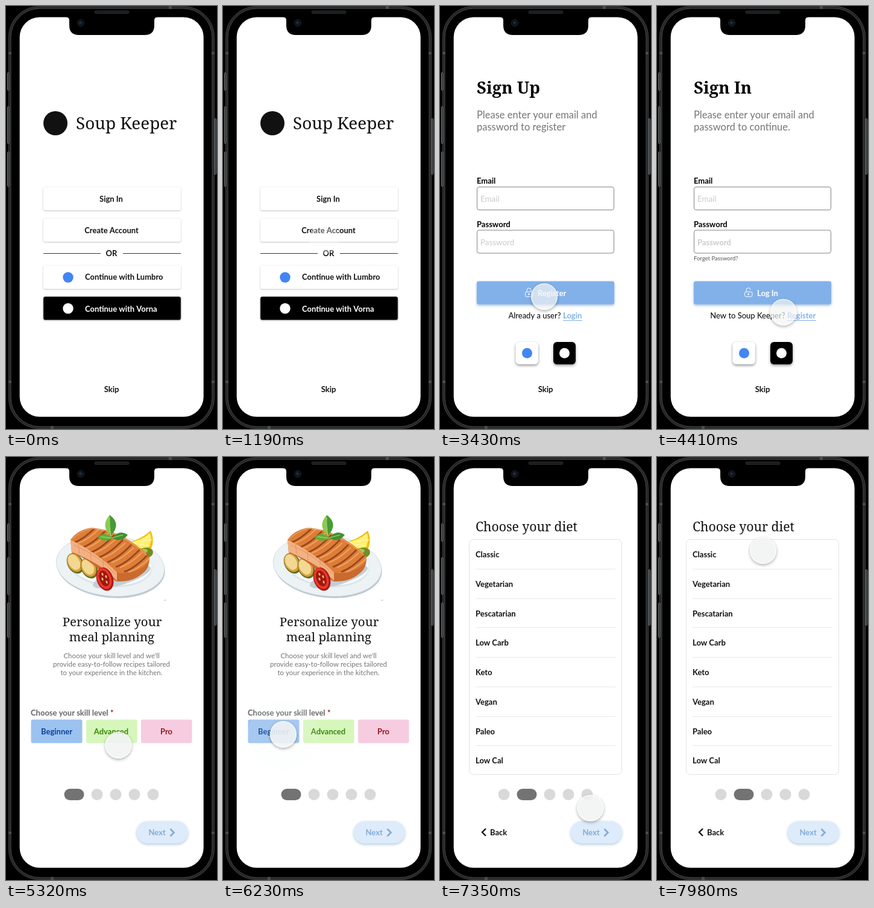
Recreate the animation shown at these times as an HTML page with a canvas. Size 350 by 700 pixels, loop 8 s.

```html
<!DOCTYPE html>
<html lang="en">
<head>
<meta charset="utf-8">
<title>Recipe app onboarding</title>
<style>
  html, body { margin: 0; width: 100%; height: 100%; overflow: hidden; background: #000; }
  canvas { display: block; width: 350px; height: 700px; }
</style>
</head>
<body>
<canvas id="stage" width="350" height="700"></canvas>
<script>
const ctx = document.getElementById('stage').getContext('2d');
const LOOP = 8000;
const SANS = 'Lato, sans-serif';
const SERIF = '"Noto Serif", serif';
const BLUE = '#82b1ea';

// ---------- helpers ----------
const clamp = v => Math.max(0, Math.min(1, v));
const progress = (t, from, to) => clamp((t - from) / (to - from));
const easeInOut = p => p * p * (3 - 2 * p);
const easeOut = p => 1 - (1 - p) ** 3;

function text(str, x, y, { size = 13, weight = 'bold', color = '#111', align = 'left', family = SANS } = {}) {
  ctx.font = `${weight} ${size}px ${family}`;
  ctx.fillStyle = color;
  ctx.textAlign = align;
  ctx.fillText(str, x, y);
}

const centered = (str, x, y, options = {}) => text(str, x, y, { ...options, align: 'center' });

function box(x, y, w, h, r, fill, stroke, width = 1) {
  ctx.beginPath();
  ctx.roundRect(x, y, w, h, r);
  if (fill) { ctx.fillStyle = fill; ctx.fill(); }
  if (stroke) { ctx.strokeStyle = stroke; ctx.lineWidth = width; ctx.stroke(); }
}

function shadowed(color, blur, dy, draw) {
  ctx.save();
  ctx.shadowColor = color;
  ctx.shadowBlur = blur;
  ctx.shadowOffsetY = dy;
  draw();
  ctx.restore();
}

function oval(x, y, rx, ry, fill, angle = 0, stroke, width = 1) {
  ctx.beginPath();
  ctx.ellipse(x, y, rx, ry, angle, 0, Math.PI * 2);
  if (fill) { ctx.fillStyle = fill; ctx.fill(); }
  if (stroke) { ctx.strokeStyle = stroke; ctx.lineWidth = width; ctx.stroke(); }
}

const dot = (x, y, r, fill) => oval(x, y, r, r, fill);

function shape(d, fill) {
  ctx.fillStyle = fill;
  ctx.fill(new Path2D(d));
}

function line(d, color, width = 1) {
  ctx.strokeStyle = color;
  ctx.lineWidth = width;
  ctx.stroke(new Path2D(d));
}

// ---------- shared parts ----------
const skip = () => centered('Skip', 175, 639);

function pageDots(active) {
  let x = 96.5;
  for (let i = 0; i < 5; i++) {
    const w = i === active ? 33 : 19;
    box(x, 549, w, 19, 9.5, i === active ? '#737373' : '#d9d9d9');
    x += w + 12;
  }
}

function nextButton() {
  shadowed('rgba(95,140,190,.45)', 4, 2, () => box(216.5, 602.5, 85.5, 37, 18.5, '#deebfa'));
  text('Next', 236.5, 626, { color: '#83abd8' });
  line('M272.5 615.5 L278.5 621.5 L272.5 627.5', '#83abd8', 2.8);
}

function headline(title, lines) {
  text(title, 61, 145, { size: 27.5, family: SERIF, color: '#000' });
  lines.forEach((str, i) => text(str, 61, 186 + i * 19.5, { size: 16.5, weight: 'normal', color: '#757575' }));
}

function field(label, y, weight) {
  text(label, 61, y - 5, { color: '#000' });
  box(61.5, y + .5, 227, 38, 3.5, '#fff', '#848484');
  text(label, 67, y + 25, { size: weight === 'bold' ? 13 : 13.4, weight, color: '#cbcbcb' });
}

function lock(x, open) {
  line(`M${x + 3} 473 V470.5 a3.6 3.6 0 0 1 7.2 ${open ? -.8 : 0} ${open ? '' : 'V473'}`, '#fff');
  box(x + .5, 473, 12.5, 8, 2.5, null, '#fff');
  dot(x + 6.7, 477, 1.4, '#fff');
}

function form({ title, intro, boldPassword, action, actionX, open, question, questionEnd, link, linkX, linkEnd }) {
  headline(title, intro);
  field('Email', 299, 'normal');
  field('Password', 370.5, boldPassword ? 'bold' : 'normal');
  shadowed('rgba(90,140,200,.6)', 4, 2, () => box(61, 455.5, 228, 38, 3, BLUE));
  lock(actionX - 21, open);
  text(action, actionX, 480, { color: '#fff' });
  text(question, questionEnd, 517, { weight: 'normal', align: 'right', color: '#000' });
  text(link, linkX, 517, { color: BLUE });
  line(`M${linkX} 520.5 H${linkEnd}`, BLUE);
  const edge = 'rgba(0,0,0,.42)';
  shadowed(edge, 4, 2, () => box(125.5, 556, 37.5, 37, 6, '#fff'));
  shadowed(edge, 4, 2, () => box(188, 556, 37, 37, 6, '#000'));
  dot(144.5, 574.5, 8.5, '#4285f4');
  dot(206.5, 574.5, 8.5, '#fff');
  skip();
}

// ---------- screens ----------
function welcome() {
  dot(82, 194, 20, '#111');
  text('Soup Keeper', 116, 204, { size: 27.9, weight: 'normal', family: SERIF });

  const button = (y, fill) => shadowed('rgba(0,0,0,.24)', 3, 1, () => box(62, y, 228, 38.5, 3, fill));
  [299.5, 351.5, 429.5].forEach(y => button(y, '#fff'));
  button(481, '#000');
  box(62, 481, 228, 38.5, 3, null, '#777', .8);
  centered('Sign In', 174.5, 324);
  centered('Create Account', 175, 376);
  line('M62 409.5 H157 M194 409.5 H290', '#333');
  centered('OR', 175, 414);
  dot(103, 449, 8.7, '#4285f4');
  text('Continue with Lumbro', 131, 453);
  dot(103, 500.5, 8.7, '#fff');
  text('Continue with Vorna', 131, 506, { color: '#fff' });
  skip();
}

const signUp = () => form({
  title: 'Sign Up', intro: ['Please enter your email and', 'password to register'],
  action: 'Register', actionX: 162,
  question: 'Already a user?', questionEnd: 200.5, link: 'Login', linkX: 204, linkEnd: 236
});

function signIn() {
  form({
    title: 'Sign In', intro: ['Please enter your email and', 'password to continue.'], boldPassword: true,
    action: 'Log In', actionX: 166, open: true,
    question: 'New to Soup Keeper?', questionEnd: 212.5, link: 'Register', linkX: 216, linkEnd: 264
  });
  text('Forget Password?', 61, 421, { size: 9.5, weight: 'normal', color: '#555' });
}

function potato(x, y) {
  oval(x, y, 13, 18, '#5f6f22', -.5);
  oval(x - 1, y - 1, 11.5, 16, '#d9a23e', -.5);
  oval(x - 2, y - 2, 9, 13.5, '#f3d892', -.5);
}

function meal() {
  oval(174, 183, 90, 50, '#bcc8d1', .1);
  oval(173, 180, 90, 50, '#edf2f5', .1, '#d3dbe2');
  oval(173, 178, 70, 37, '#dce4ea', .1);
  oval(173, 176, 69, 36, '#f7f9fa', .1);
  oval(192, 198, 50, 13, '#c4ced5', -.3);
  potato(115, 176);
  potato(138, 184);

  // lemon wedge and olive
  shape('M199 142 Q222 138 240 122 Q248 139 239 155 Q220 161 199 142', '#f0bf12');
  shape('M203 142 Q225 138 239 126 Q244 139 235 151 Q219 153 203 142', '#fff06a');
  line('M207 142 L239 147 M208 141 L243 137 M238 127 L222 148', '#fffbd0');
  oval(231, 159, 13, 9, '#758b24', -.2);
  oval(228, 156, 7, 4, '#b3bf58', -.2);

  // fillet
  const top = 'M107 137 Q118 121 141 117 Q192 120 237 164 Q241 176 220 186 Q202 195 184 191 Q150 157 107 137 Z';
  shape('M107 137 Q153 157 184 190 Q211 192 238 167 Q238 185 226 193 Q210 207 184 206 Q168 199 156 188 Q138 170 109 158 Z', '#c96a2e');
  shape('M107 137 Q153 157 184 190 L184 205 Q161 178 109 157 Z', '#f3b183');
  line('M113 146 Q154 163 182 194 M120 143 L122 160 M140 153 L141 171 M161 168 L161 184', '#dd925e');
  shape(top, '#dd7d38');
  ctx.save();
  ctx.clip(new Path2D(top));
  for (let i = 0; i < 9; i++) {
    const x = 112 + i * 14, y = 138 + i * 8;
    line(`M${x} ${y + 4} Q${x + 18} ${y - 2} ${x + 40} ${y - 25}`, '#97471d', 2.6);
    line(`M${x + 7} ${y + 5} Q${x + 24} ${y - 1} ${x + 44} ${y - 20}`, '#f0a35c', 2);
  }
  ctx.restore();
  line('M110 136 Q121 124 141 118 Q190 122 234 163', '#f5b579');

  // tomato
  oval(164, 202, 13.5, 20, '#a81715', -.35);
  oval(163, 201, 11.5, 18, '#e93827', -.35);
  oval(163, 201, 8, 13.5, '#9f1713', -.35);
  [[160, 194], [166, 198], [160, 202], [167, 207]].forEach(([x, y]) => oval(x, y, 1.4, 2.5, '#f6c06b', -.4));

  // basil
  shape('M176 135 Q163 143 152 133 Q162 122 176 133', '#5fae38');
  shape('M176 134 Q188 119 202 129 Q191 143 176 134', '#3f9230');
  shape('M174 130 Q156 114 172 96 Q192 111 174 130', '#8acb4d');
  shape('M174 130 Q170 114 172 96 Q192 111 174 130', '#479b35');
  line('M174 131 Q171 112 172 100 M175 134 L194 129 M174 134 L157 132', '#b5e080');
  line('M262 237 H266', '#bbb');
}

function skillLevel(t) {
  meal();
  const heading = { size: 20.5, weight: 'normal', family: SERIF };
  centered('Personalize your', 176, 280, heading);
  centered('meal planning', 175.5, 305, heading);
  ['Choose your skill level and we\'ll', 'provide easy-to-follow recipes tailored', 'to your experience in the kitchen.']
    .forEach((str, i) => centered(str, 175, 333 + i * 14, { size: 11.5, weight: 'normal', color: '#757575' }));
  text('Choose your skill level', 41, 428, { color: '#666' });
  text('*', 173, 428, { color: '#941c12' });

  const picked = t >= 6300;
  box(41.5, 434.5, 85, 39, 3, picked ? '#94abcf' : '#9cc2f0');
  box(133, 434.5, 84.5, 39, 3, '#d7f6bb');
  box(224, 434.5, 84.5, 39, 3, '#f6cce1');
  if (picked) box(40, 434, 87.5, 40, 5, null, '#000', 2.5);
  centered('Beginner', 84, 459, { color: '#064494' });
  centered('Advanced', 174.5, 459, { color: '#38860b' });
  centered('Pro', 266, 459, { color: '#991717' });
  pageDots(0);
  nextButton();
}

function diet() {
  text('Choose your diet', 59, 123, { size: 21.2, weight: 'normal', family: SERIF });
  box(48.5, 136.5, 253, 389, 7, '#fff', '#e2e2e2');
  ['Classic', 'Vegetarian', 'Pescatarian', 'Low Carb', 'Keto', 'Vegan', 'Paleo', 'Low Cal'].forEach((name, i) => {
    const y = 166 + i * 48.75;
    text(name, 59, Math.round(y));
    if (i) line(`M59 ${Math.round(y - 30) + .5} H291`, '#e8e8e8');
  });
  pageDots(1);
  line('M76 615 L70 621 L76 627', '#111', 2.4);
  text('Back', 83, 626);
  nextButton();
}

const SCREENS = [[7210, diet], [5320, skillLevel], [4130, signIn], [2240, signUp], [0, welcome]];

// ---------- touch cursor ----------
const PATH = [
  [0, 168, 383], [2240, 168, 387], [2520, 168, 391], [2870, 163, 459], [3080, 163, 474],
  [3430, 173, 481], [3710, 211.5, 509], [4340, 211.5, 509], [4760, 186.5, 477], [5740, 186.5, 477],
  [6020, 100, 459], [6300, 100, 459], [6580, 242, 575], [6790, 253.5, 597], [6930, 256, 606],
  [7280, 256, 606], [7420, 243, 556], [7770, 176, 134], [7980, 176, 155], [LOOP, 176, 155]
];
const TAPS = [1960, 3850, 5040, 6090, 6930];

function cursorAt(t) {
  const i = PATH.findIndex(([time]) => time > t);
  const [t0, x0, y0] = PATH[i - 1], [t1, x1, y1] = PATH[i];
  const p = easeInOut(progress(t, t0, t1));
  return [x0 + (x1 - x0) * p, y0 + (y1 - y0) * p];
}

// Keeps the drop shadow from showing through the translucent disc.
function disc(x, y, r, fill) {
  ctx.save();
  const outside = new Path2D();
  outside.rect(0, 0, 350, 700);
  outside.arc(x, y, r, 0, Math.PI * 2);
  ctx.clip(outside, 'evenodd');
  shadowed('rgba(0,0,0,.32)', 5, 2, () => dot(x, y, r, '#f4f6f6'));
  ctx.restore();
  dot(x, y, r, fill);
}

function cursor(t) {
  if (t < 840) return;
  const [x, y] = cursorAt(t);

  const tap = TAPS.find(start => t >= start && t < start + 210);
  if (tap !== undefined) {
    const p = (t - tap) / 210;
    dot(x, y, 22 + 38 * easeOut(p), `rgba(235,240,243,${.35 * (1 - p)})`);
  }

  if (t < 2240) {
    const p = progress(t, 840, 1470);
    dot(x, y, 60 - 38 * easeOut(p), `rgba(255,255,255,${.55 * p})`);
    return;
  }
  disc(x, y, 22, `rgba(242,244,244,${t < 5320 ? .7 : .88})`);
  oval(x, y, 21.3, 21.3, null, 0, 'rgba(255,255,255,.5)', 1.4);
}

// ---------- phone ----------
const SCREEN = new Path2D();
SCREEN.roundRect(22.7, 18.5, 305, 661.2, 33);

function frame() {
  ctx.fillStyle = '#000';
  ctx.fillRect(0, 0, 350, 700);
  box(6, 2, 338, 696, 50, null, '#222425', 4);
  box(4.5, .8, 341, 698.4, 51, null, '#3c3f41', 1);
  box(8, 4, 334, 692, 48, null, '#4c4f51', 1);
  [[2, 110, 29], [2, 166, 61], [2, 241, 57], [345.5, 186, 92]].forEach(([x, y, h]) =>
    box(x + .5, y + .5, 2.5, h, 1, '#17191a', '#85888a'));
  ctx.fillStyle = '#4a4d4f';
  [[4, 76, 5, 4], [341, 76, 5, 4], [4, 620, 5, 4], [341, 620, 5, 4], [270, 0, 5, 5], [74, 695, 5, 5]]
    .forEach(r => ctx.fillRect(...r));
  box(147, 8, 57, 4.5, 2, '#1c1d1e', '#303132', .7);
}

function notch() {
  shape('M100 17 H251 V18.5 Q246 18.5 246 24 V32 Q246 48 230 48 H121 Q105 48 105 32 V24 Q105 18.5 100 18.5 Z', '#000');
  oval(124, 28, 5.5, 5.5, '#0d1116', 0, '#1c2228');
  dot(124, 28, 2.7, '#12263c');
  dot(122.8, 27, 1, '#2c4763');
}

function render(t) {
  frame();
  ctx.save();
  ctx.clip(SCREEN);
  ctx.fillStyle = '#fff';
  ctx.fillRect(22, 18, 307, 663);
  SCREENS.find(([start]) => t >= start)[1](t);
  cursor(t);
  ctx.restore();
  notch();
}

let start;
function tick(now) {
  start ??= now;
  render((now - start) % LOOP);
  requestAnimationFrame(tick);
}
render(0);
requestAnimationFrame(tick);
</script>
</body>
</html>
```
